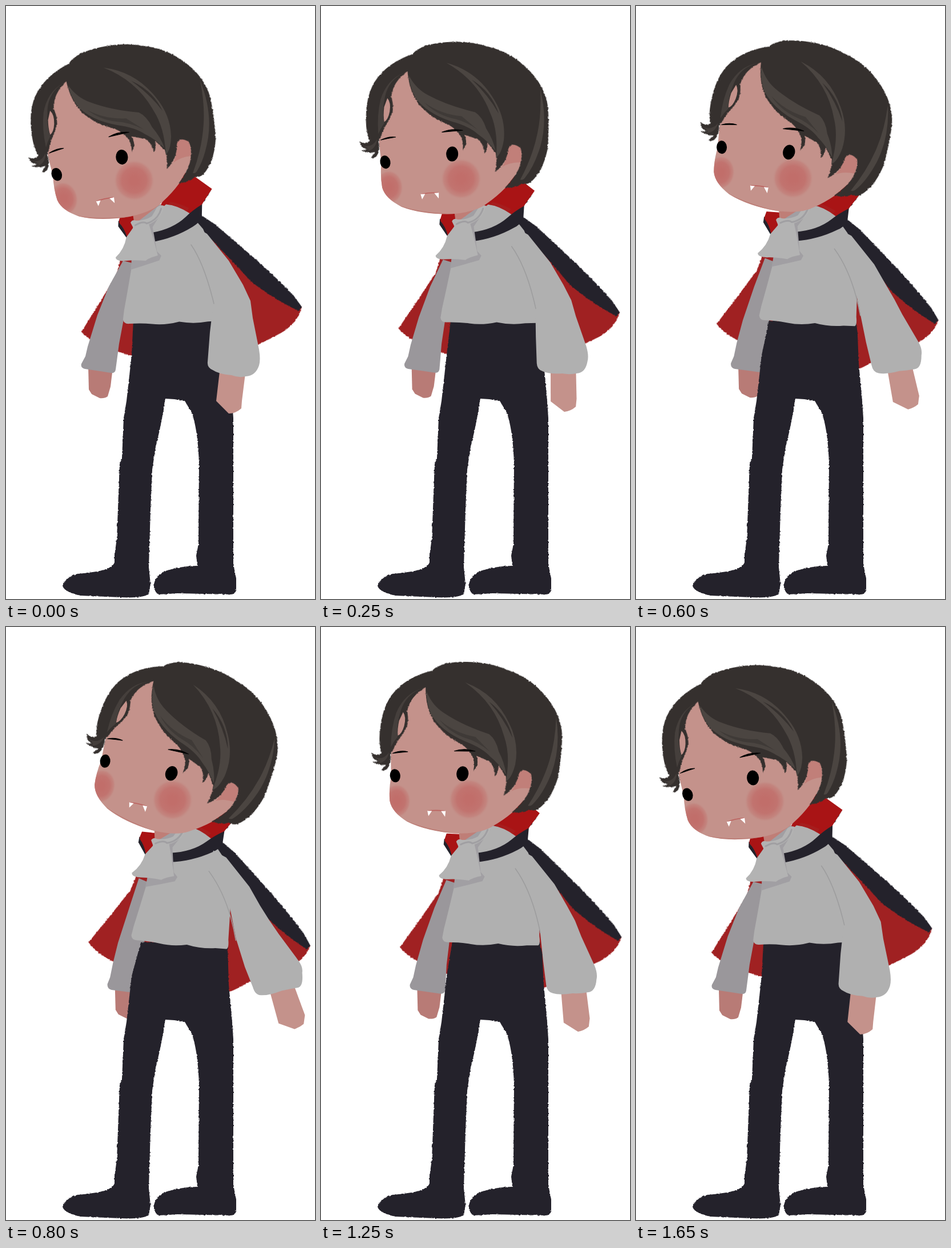
Write an HTML page that moves like this. It is 541x1036 px and loops after 1.7 s.

```html
<!DOCTYPE html>
<html lang="en">
<head>
<meta charset="utf-8">
<title>Swaying vampire</title>
<style>
html, body { margin: 0; width: 100%; height: 100%; overflow: hidden; background: #fff; }
svg { display: block; width: 100%; height: 100%; }
.shirt { fill: #b0b0b0; }
.dark { fill: #24222b; }
.skin { fill: #c4928b; }
.hair { fill: #35302e; }
.shine { fill: #4b4541; }
.line { fill: none; stroke-linecap: round; }
</style>
</head>
<body>
<svg viewBox="0 0 541 1036">
  <defs>
    <filter id="rough" x="-5%" y="-5%" width="110%" height="110%" color-interpolation-filters="sRGB">
      <feTurbulence type="fractalNoise" baseFrequency=".3" numOctaves="2" seed="4"/>
      <feDisplacementMap in="SourceGraphic" scale="3" xChannelSelector="R" yChannelSelector="G"/>
    </filter>
    <radialGradient id="blush">
      <stop offset=".2" stop-color="#c16e6a"/>
      <stop offset=".6" stop-color="#c1706c" stop-opacity=".9"/>
      <stop offset=".85" stop-color="#c27772" stop-opacity=".5"/>
      <stop offset="1" stop-color="#c4928b" stop-opacity="0"/>
    </radialGradient>
    <clipPath id="faceClip"><use href="#face"/></clipPath>
  </defs>

  <g class="torso">
    <g filter="url(#rough)">
      <path fill="#a02122" d="M215 436 L205 465 L170 515 L145 550 L138 560 Q148 573 165 582 Q190 596 220 606 L300 622 L391 630 Q404 624 418 614 L480 587 Q505 577 520 555 L526 541 L440 470 L395 415 L345 375 L230 400Z"/>
      <path class="dark" d="M382 325 L362 352 L358 368 L383 387 L416 419 L453 455 L491 495 L512 519 L526 541 L520 548 Q475 522 440 491 L415 460 L377 415 L350 398 L335 380Z"/>
    </g>
    <path class="dark" d="M215 370 L214 380 L230 405 L240 390Z"/>
    <path fill="#a91415" d="M216 370 L219 361 L246 362 L240 385 L228 399 Q225 385 216 374Z"/>
    <path fill="#a91415" d="M288 352 L308 318 L335 293 L350 299 L382 325 L362 352 L340 372Z"/>
  </g>

  <path id="handL" fill="#b87b76"/>
  <path id="sleeveL" fill="#9a979b"/>
  <path id="legs" class="dark" filter="url(#rough)"/>

  <g class="torso">
    <path class="shirt" d="M238 430 Q228 475 215 527 L212 543 Q213 551 222 551 Q245 551 262 554 Q285 558 310 553 Q335 559 360 556 L380 556 Q384 554 382 540 L382 450 L362 394 L340 365 Q320 350 300 347 L270 370Z"/>
    <path fill="#a0302d" opacity=".35" d="M303 348 Q318 349 335 362 L340 356 Q322 346 308 343Z"/>
    <path class="dark" d="M270 395 Q309 391 333 371 Q346 360 363 351 L361 374 Q355 384 344 389 Q310 407 271 411Z"/>
  </g>

  <path id="handR" class="skin"/>
  <path id="sleeveR" class="shirt"/>
  <path id="seam" class="line" stroke="#9c9c9d" stroke-width="1.5"/>

  <g class="torso">
    <path fill="#bf7e77" d="M240 352 L292 346 L280 366 L262 376 L242 372Z"/>
    <path fill="#a19fa3" d="M233 445 L231 457 L255 451 L282 444 L286 436 L279 428 L274 385 L296 354 L290 346 L240 380Z"/>
    <path fill="#b3b3b3" d="M236 375 Q239 369 246 372 Q262 373 274 366 L284 351 Q292 346 297 350 Q290 372 268 380 L274 405 L280 435 Q265 438 258 443 Q238 440 222 441 Q206 441 206 434 Q222 421 227 400 L240 384Z"/>
    <path class="line" stroke="#a09fa2" stroke-width="3" d="M244 380 Q258 373 264 378 Q284 374 291 354"/>

    <g id="head">
      <path id="face" class="skin" d="M178 100 L140 120 L120 225 L121 262 Q117 285 119 305 Q123 325 150 341 Q185 358 238 361 Q280 361 299 348 Q318 337 333 324 L365 290 L372 240 L300 150Z"/>
      <g clip-path="url(#faceClip)">
        <ellipse cx="131" cy="305" rx="25" ry="30" fill="url(#blush)"/>
        <path class="line" stroke="#bb7770" stroke-width="2" opacity=".7" d="M125 326 Q150 350 238 362"/>
      </g>
      <circle cx="258" cy="301" r="36" fill="url(#blush)"/>
      <path fill="#c17f79" d="M344 252 Q356 246 366 254 Q368 270 364 281 Q345 279 332 286 Q342 272 344 252Z"/>

      <g filter="url(#rough)">
        <path class="hair" d="M180 106 Q153 122 148 148 Q153 170 143 184 Q134 197 127 209 Q124 218 119 224 Q122 240 113 250 Q108 254 103 252 L112 242 Q97 244 88 237 L98 236 Q86 232 86 220 Q93 228 104 222 Q98 205 101 180 Q104 145 120 121 Q145 88 191 77 Q205 61 250 61 Q290 61 322 74 Q362 87 388 117 Q418 150 420 190 Q419 230 413 262 Q402 300 379 317 Q369 322 363 318 Q355 325 333 323 Q350 309 360 292 Q370 270 366 256 Q352 243 345 255 Q340 281 318 294 Q324 279 322 262 L309 241 Q309 255 302 261 Q304 248 294 235 L270 225 Q276 241 265 251 Q268 239 263 226 Q254 210 240 203 Q214 190 197 168 Q180 144 180 106Z"/>
      </g>
      <path class="skin" d="M141 150 Q147 158 143 174 Q139 188 132 191 Q131 180 134 165Z"/>
      <path class="shine" opacity=".75" d="M174 108 Q146 118 137 147 Q129 172 132 193 Q125 201 120 211 Q120 178 129 151 Q143 117 174 108Z"/>
      <path class="shine" d="M182 114 Q192 138 213 151 Q245 172 292 187 Q304 196 309 217 Q320 238 322 257 Q308 237 294 226 Q280 211 250 200 Q207 182 190 153 Q181 132 182 114Z"/>
      <path class="hair" opacity=".5" d="M205 163 Q232 186 268 192 L294 218 Q272 200 250 194 Q222 184 205 163Z"/>
      <path class="shine" d="M249 97 Q302 116 327 168 Q345 203 338 240 Q332 264 322 269 Q330 223 318 190 Q301 132 249 97Z"/>
      <path class="hair" d="M291 130 Q324 154 333 193 Q318 160 291 130Z"/>
      <path class="shine" d="M409 156 Q418 211 401 256 Q387 291 369 309 Q365 313 361 311 Q386 273 398 232 Q408 198 409 156Z"/>
      <path class="shine" opacity=".7" d="M91 229 Q107 235 117 220 Q114 238 96 240 Q107 237 91 229Z"/>

      <path d="M123 222 Q137 216 150 219 Q137 220 123 222Z M231 217 Q249 211 268 217 Q250 217 231 217Z" stroke="#050505"/>
      <ellipse cx="128" cy="261" rx="9" ry="11.5" transform="rotate(-8 128 261)"/>
      <ellipse cx="246" cy="256.5" rx="10.5" ry="13" transform="rotate(7 246 256)"/>
      <path class="line" stroke="#bc625f" stroke-width="1.6" d="M187 322 Q200 320 215 322"/>
      <path fill="#fff" d="M185 322 L193 322 L187 331Z M209 322 L217 322 L216 332Z"/>
    </g>
  </g>
</svg>
<script>
const $ = id => document.getElementById(id);

// Each limb blends between a slumped pose and a raised pose.
const limbs = {
  handL: [
    "M144 630L187 632L183 665L178 682Q172 686 164 685L150 678L145 670Z",
    "M183 630L226 632L222 664L217 681Q211 685 203 684L189 677L184 669Z"],
  sleeveL: [
    "M205 445L225 450L214 505L205 553L198 590L192 635Q191 642 184 641L165 638L138 634Q130 632 132 625L139 612L143 595L160 540L180 490Z",
    "M228 440L248 448L240 500L236 553L233 590L233 635Q230 642 222 640L200 637L177 634Q169 632 170 624L175 612L180 588L190 550L210 490Z"],
  handR: [
    "M375 630L420 634L413 690L412 703Q402 712 390 712L368 690Z",
    "M447 634L490 627L505 680L503 695Q496 701 486 704L459 692Z"],
  sleeveR: [
    "M333 387L352 398L390 445L415 487L428 515L432 545L443 600Q446 618 443 628Q437 646 420 647Q408 650 395 645Q372 643 362 636Q352 632 353 622L357 570L363 520L352 470L325 418Z",
    "M358 390L380 402L420 452L440 487L455 512L470 538L500 585Q508 598 506 608Q507 632 495 633Q482 635 468 637Q445 644 432 642Q422 641 419 628L408 590L396 540L385 485L350 425Z"],
  seam: ["M324 417Q347 450 364 520", "M350 425Q383 470 396 543"],
  legs: [
    "M223 548L378 548L386 570L390 625",
    "M234 550L386 552L388 570L390 625"]
};
const lower = "L396 690L398 720L398 975L403 1000L403 1018Q402 1028 393 1028L300 1026L268 1028Q258 1024 259 1010Q263 990 290 984Q312 978 335 978L333 960L337 940L338 800Q336 740 325 710L313 690L295 687L279 686Q272 732 262 770L256 810L253 880L250 980L253 1010L250 1027Q240 1035 200 1033L130 1030Q102 1024 99 1013Q104 998 125 992Q150 990 168 986Q187 981 190 972L190 960L194 930L199 800L203 790L206 720L211 690L220 610Z";
limbs.legs = limbs.legs.map(top => top + lower);

function blend([a, b], k) {
  const ends = b.match(/\d+/g);
  let i = 0;
  return a.replace(/\d+/g, n => (+n + (ends[i++] - n) * k).toFixed(2));
}

function draw(ms) {
  const time = Math.floor(ms % 1700 / 50) * 50;
  const rise = 1 - Math.abs(1 - time / 833.33);
  const turn = rise - .48; // the torso and head are drawn near mid-sway
  for (const id in limbs) $(id).setAttribute("d", blend(limbs[id], rise / .8));
  for (const part of document.querySelectorAll(".torso"))
    part.setAttribute("transform", `rotate(${7.6 * turn} 283 658)`);
  $("head").setAttribute("transform", `rotate(${18.8 * turn} 257 371)`);
}

const start = performance.now();
function tick() {
  draw(performance.now() - start);
  requestAnimationFrame(tick);
}
tick();
</script>
</body>
</html>
```
